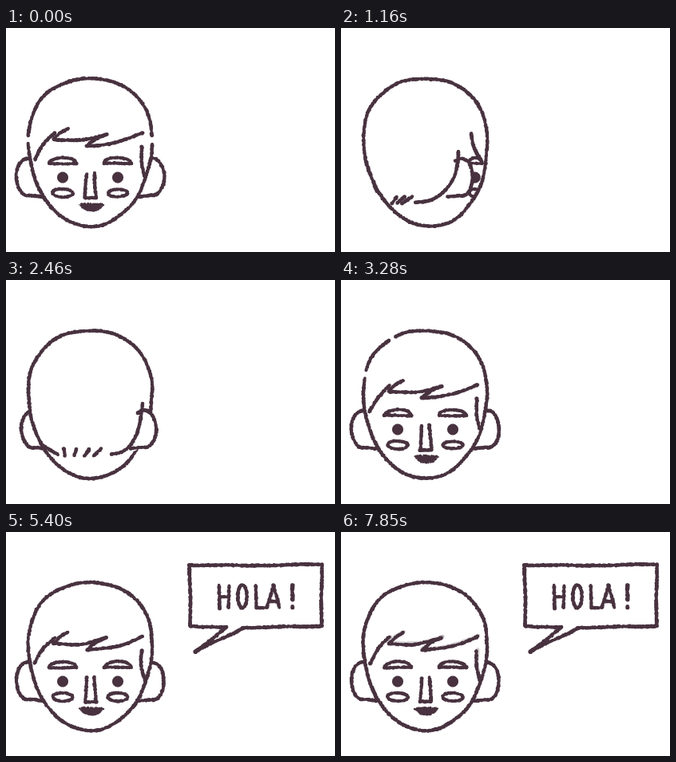
Recreate the animation shown at these times as an HTML page with a canvas. Size 412 px wide and 281 px high, loop 8 s.

```html
<!DOCTYPE html>
<html lang="es">
<head>
<meta charset="utf-8">
<title>Hola</title>
<style>
  html, body { margin: 0; width: 100%; height: 100%; overflow: hidden; background: #fff; }
  canvas { display: block; width: 412px; height: 281px; }
</style>
</head>
<body>
<canvas id="stage" width="412" height="281" role="img" aria-label="HOLA !"></canvas>
<script>
const ctx = document.getElementById('stage').getContext('2d');
const INK = '#48323f', LOOP = 8000, RAD = Math.PI / 180;
const CX = 105.5, FACE = 52;

// Timing in ms; each drawing is held, then replaced.
const TURN_HOLD = 129.2, IDLE_HOLD = 170, POP_HOLD = 80;
const TURN_END = 3110, POP_START = 5150, POP_END = 5470;
const IDLE = 24, POP = 36, SPEAK = 40;

function drawingAt(time) {
  const since = (start, hold) => Math.floor((time - start) / hold);
  if (time < TURN_END) return since(0, TURN_HOLD);
  if (time < POP_START) return IDLE + since(TURN_END, IDLE_HOLD);
  if (time < POP_END) return POP + since(POP_START, POP_HOLD);
  return SPEAK + since(POP_END, IDLE_HOLD);
}

let seed = 1;
function rnd() {
  seed = (seed * 16807) % 2147483647;
  return seed / 2147483647;
}
const jitter = size => (rnd() * 2 - 1) * size;

function arc(cx, cy, rx, ry, from, to) {
  const count = Math.ceil((to - from) / 20);
  return Array.from({ length: count + 1 }, (_, i) => {
    const a = (from + (to - from) * i / count) * RAD;
    return [cx + rx * Math.cos(a), cy + ry * Math.sin(a)];
  });
}

// Stroke between two points with a slight sag to one side
function bow([x1, y1], [x2, y2]) {
  const dx = x2 - x1, dy = y2 - y1, sag = 0.065;
  return [[x1, y1], [(x1 + x2) / 2 - dy * sag, (y1 + y2) / 2 + dx * sag], [x2, y2]];
}

function spline(points, closed) {
  const n = points.length, out = [];
  const at = i => closed ? points[(i + n) % n] : points[Math.max(0, Math.min(n - 1, i))];
  for (let i = 0; i < (closed ? n : n - 1); i++) {
    const [a, b, c, d] = [at(i - 1), at(i), at(i + 1), at(i + 2)];
    const steps = Math.max(2, Math.ceil(Math.hypot(c[0] - b[0], c[1] - b[1]) / 1.1));
    for (let k = 0; k < steps; k++) {
      const t = k / steps;
      out.push([0, 1].map(j => b[j] + t / 2 * (c[j] - a[j] +
        t * (2 * a[j] - 5 * b[j] + 4 * c[j] - d[j] + t * (3 * (b[j] - c[j]) + d[j] - a[j])))));
    }
  }
  out.push(closed ? points[0] : points[n - 1]);
  return out;
}

function trace(points) {
  ctx.beginPath();
  spline(points, true).forEach(p => ctx.lineTo(p[0], p[1]));
  ctx.closePath();
}

function fill(points, color) {
  trace(points);
  ctx.fillStyle = color;
  ctx.fill();
}

// Grainy brush line; gaps are points where the pen is lifted.
function ink(points, { closed = false, width = 4.3, gaps = [] } = {}) {
  const phase = rnd() * 7;
  ctx.fillStyle = INK;
  ctx.beginPath();
  spline(points, closed).forEach(([x, y], i) => {
    const wave = 0.4 * Math.sin(i * 0.11 + phase);
    const px = x + wave + jitter(0.35), py = y + wave + jitter(0.35);
    const r = width / 2 + jitter(0.45);
    if (gaps.some(g => Math.hypot(g[0] - x, g[1] - y) < 4.5)) return;
    ctx.moveTo(px + r, py);
    ctx.arc(px, py, r, 0, 7);
  });
  ctx.fill();
}

const lines = (points, options) =>
  points.slice(1).forEach((p, i) => ink([points[i], p], options));

// Round crown above, long jaw below; the chin swings with the turn.
function skull(chin) {
  return Array.from({ length: 24 }, (_, i) => {
    const c = Math.cos(i * 15 * RAD), s = Math.sin(i * 15 * RAD);
    const power = s < 0 ? 0.91 : 1;
    const y = 140 + (s < 0 ? 76.5 : 109) * Math.sign(s) * Math.abs(s) ** power;
    const swing = chin * Math.max(0, (y - 150) / 95);
    return [CX + 77.5 * Math.sign(c) * Math.abs(c) ** power + swing, y];
  });
}

function ear(centre, dir, from) {
  return [...arc(0, 187, 15, 23.5, from, 100), [-17, 212]]
    .map(([x, y]) => [centre + dir * x, y]);
}

// Key points: x, y, depth
const fringe = [[78, 126, 80], [60, 140, 85], [126, 133, 50], [101, 148, 42], [171, 131, 40]];
const sideburns = [[[61, 132, 40], [36, 165, 40]], [[170, 149, 49], [174, 187, 36]]];
const strands = [...fringe.slice(1).map((tip, i) => [fringe[i], tip]), ...sideburns];

function turned(angle) {
  const sin = Math.sin(angle), cos = Math.cos(angle);
  return {
    sin, cos,
    x(u, depth) {
      const reach = depth < 0 ? Math.max(1, 2 * Math.abs(sin)) : 1;
      return CX + Math.max(-82, Math.min(82, u * cos - depth * sin * reach));
    },
    z: (u, depth) => u * sin + depth * cos
  };
}

// A strand shows while its end faces the viewer.
function drawHair(view) {
  for (const [root, tip] of strands) {
    if (view.cos < -0.6 || view.z(tip[0] - CX, tip[2]) < 4) continue;
    const place = ([x, y, depth]) => [view.x(x - CX, depth), y];
    ink(bow(place(root), place(tip)));
  }
}

function drawNape(view) {
  const { sin, cos } = view;
  for (const side of [-1, 1]) {
    if (view.z(side * 45, -23) <= 0) continue;
    ink(arc(0, 155, 1, 64, 0, 90).map(([bend, y]) =>
      [view.x(side * (45 + 27 * bend), 29 * bend - 23), y]));
  }
  for (let u = -24; u <= 24; u += 16) {
    if (view.z(u, -23) < 0) continue;
    const x = view.x(u, -23), lean = (34 * sin + u * 0.87) * 0.13;
    ink([[x - lean, 212], [x + lean, 220.5]]);
  }
  if (cos < -0.8 && Math.abs(sin) > 0.1) {
    const far = Math.sign(sin);
    ink([[CX + far * 59, 208], [CX + far * 41, 218.5]]);
  }
}

function drawFace(view, angle, head) {
  ctx.save();
  trace(head);
  ctx.clip();
  for (const side of [-1, 1]) {
    const u = side * 34.5;
    if (view.z(u, FACE) < 0) continue;
    const x = view.x(u, FACE);
    const squash = 0.5 + 0.5 * Math.min(1, Math.cos(side * 0.586 - angle) / 0.83);
    const brow = 17 * squash, cheek = 12.5 * squash;
    ink(arc(x, 170, brow, 7.5, 180, 360), { width: 4 });
    ink([[x - brow, 170], [x + brow, 170]], { width: 4 });
    fill(arc(x, 187.5, 7, 7, 0, 340), INK);
    ink(arc(x, 207, cheek, 4.8, 0, 340), { closed: true, width: 4 });
  }
  if (view.cos > -0.1) {
    const mouth = arc(view.x(0, FACE) + 1.5, 221, 6.5 + 6.5 * view.cos, 8, 0, 180);
    fill(mouth, INK);
    ink(mouth, { closed: true, width: 2 });
  }
  ctx.restore();

  if (view.cos > -0.1) {
    const x = view.x(0, FACE), tip = 18 * view.sin ** 3;
    lines([[x - 4.5, 183], [x - 6.5 - Math.max(0, tip), 213],
      [x + 7.5 - Math.min(0, tip), 213], [x + 5, 182]]);
  }
}

function drawHead(angle, lifts) {
  const view = turned(angle), { sin, cos } = view;
  const isSide = Math.abs(sin) > 0.1;
  const head = skull(-14 * sin * (1 + cos));
  const gaps = Array.from({ length: lifts }, () => head[Math.floor(rnd() * head.length)]);

  for (const side of [-1, 1]) {
    if (isSide && side * sin > 0) continue;
    const dir = side * Math.sign(cos);
    ink(ear(CX + dir * (92.5 * Math.sqrt(Math.abs(cos)) - 15), dir, -120));
  }
  fill(head, '#fff');
  drawFace(view, angle, head);
  ink(head, { closed: true, gaps });

  if (isSide) {
    const side = Math.sign(sin), isBack = cos < -0.1;
    const near = ear(CX + side * 72 * cos - 10 * sin, isBack ? -side : side, isBack ? -120 : -190);
    fill(near, '#fff');
    ink(near);
  }
  drawHair(view);
  if (cos < 0.1) drawNape(view);
}

function drawBubble(scale) {
  seed = 4321;
  ctx.save();
  ctx.translate(237, 150);
  ctx.scale(scale, scale);
  ctx.translate(-237, -150);
  lines([[230, 41.5], [312, 42], [395.5, 40.5], [395, 118], [298, 120], [237, 150],
    [276, 120], [231, 118], [230, 41.5]], { width: 4.5 });

  const top = 67, base = 95, mid = 81;
  const stem = x => ink([[x, top], [x, base]]);
  [267, 279, 313].forEach(stem);
  ink([[267, mid], [279, mid]]);
  ink(arc(296, mid, 6, 14, 0, 340), { closed: true });
  ink([[313, base], [322, base]]);
  lines([[327, base], [335, top], [342, base]]);
  ink([[330, 87], [340, 87]]);
  ink([[359, top], [359, 85]], { width: 5 });
  ink([[359, base - 1], [359, base]], { width: 5.4 });
  ctx.restore();
}

function draw(step) {
  ctx.fillStyle = '#fff';
  ctx.fillRect(0, 0, 412, 281);
  seed = 977 + step * 7919;
  const angle = step < IDLE ? step * 30 * RAD : 0;
  const isFront = Math.cos(angle) > 0.99;
  drawHead(angle, isFront && step < POP ? 2 : 0);
  if (step >= SPEAK) {
    // Faint trace of the previous hair drawing
    ctx.save();
    ctx.globalAlpha = 0.2;
    ctx.translate(1, -1.5);
    drawHair(turned(0));
    ctx.restore();
  }
  if (step >= POP) {
    const grown = Math.min(1, (step - POP + 1) / 3);
    drawBubble(grown * (2 - grown));
  }
}

let shown = -1;
function tick() {
  const step = drawingAt(performance.now() % LOOP);
  if (step !== shown) draw(shown = step);
  requestAnimationFrame(tick);
}
tick();
</script>
</body>
</html>
```
